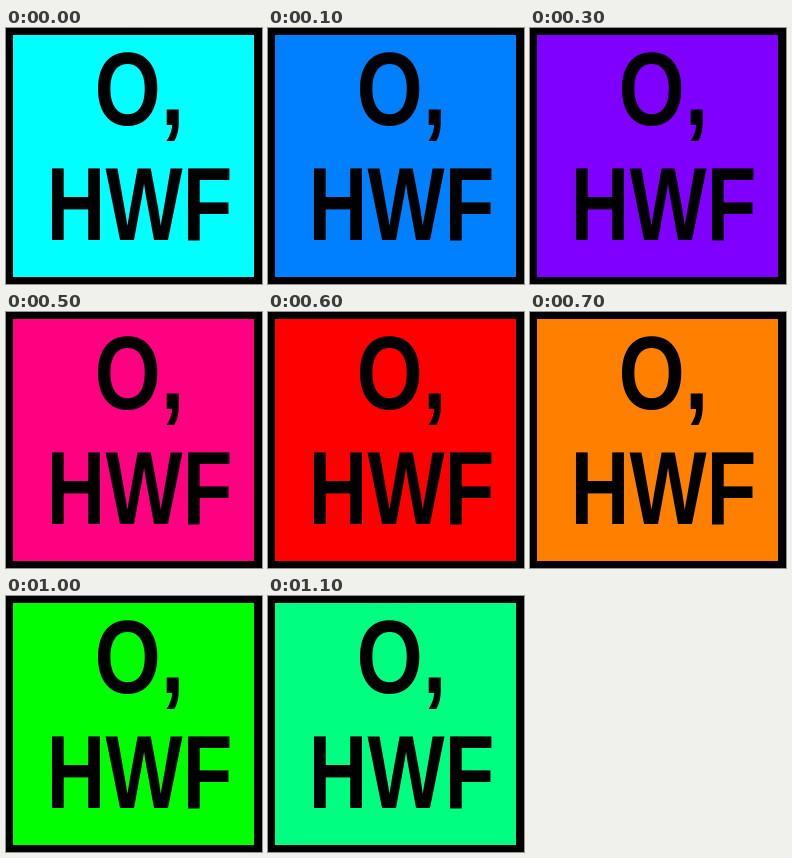
An HTML page with a canvas that plays this animation: 256x256 px, repeating every 1200 ms.

```html
<!DOCTYPE html>
<html lang="en">
<head>
<meta charset="utf-8">
<title>Colour cycle</title>
<style>
  html, body { margin: 0; width: 100%; height: 100%; overflow: hidden; background: #000; }
  canvas { display: block; width: 256px; height: 256px; }
</style>
</head>
<body>
<canvas id="stage" width="256" height="256"></canvas>
<script>
  const ctx = document.getElementById("stage").getContext("2d");
  const STEP = 100, STEPS = 12, FIRST_HUE = 180;
  const CENTER = 133.5;

  // Condensed bold lettering, centred on one axis.
  function drawLine(text, baseline, condense) {
    ctx.save();
    ctx.translate(CENTER, baseline);
    ctx.scale(condense, 1);
    ctx.fillText(text, 0, 0);
    ctx.restore();
  }

  function draw(time) {
    const step = Math.floor(time / STEP) % STEPS;
    const hue = (FIRST_HUE + step * 360 / STEPS) % 360;
    ctx.fillStyle = "#000";
    ctx.fillRect(0, 0, 256, 256);
    ctx.fillStyle = `hsl(${hue}, 100%, 50%)`;
    ctx.fillRect(7, 7, 241, 242);

    ctx.fillStyle = "#000";
    ctx.font = 'bold 104px "Liberation Sans", Arial, sans-serif';
    ctx.textAlign = "center";
    ctx.textBaseline = "alphabetic";
    drawLine("O,", 97, 0.82);
    drawLine("HWF", 212, 0.785);
  }

  const start = performance.now();
  function tick() {
    draw(performance.now() - start);
    requestAnimationFrame(tick);
  }
  tick();
</script>
</body>
</html>
```
